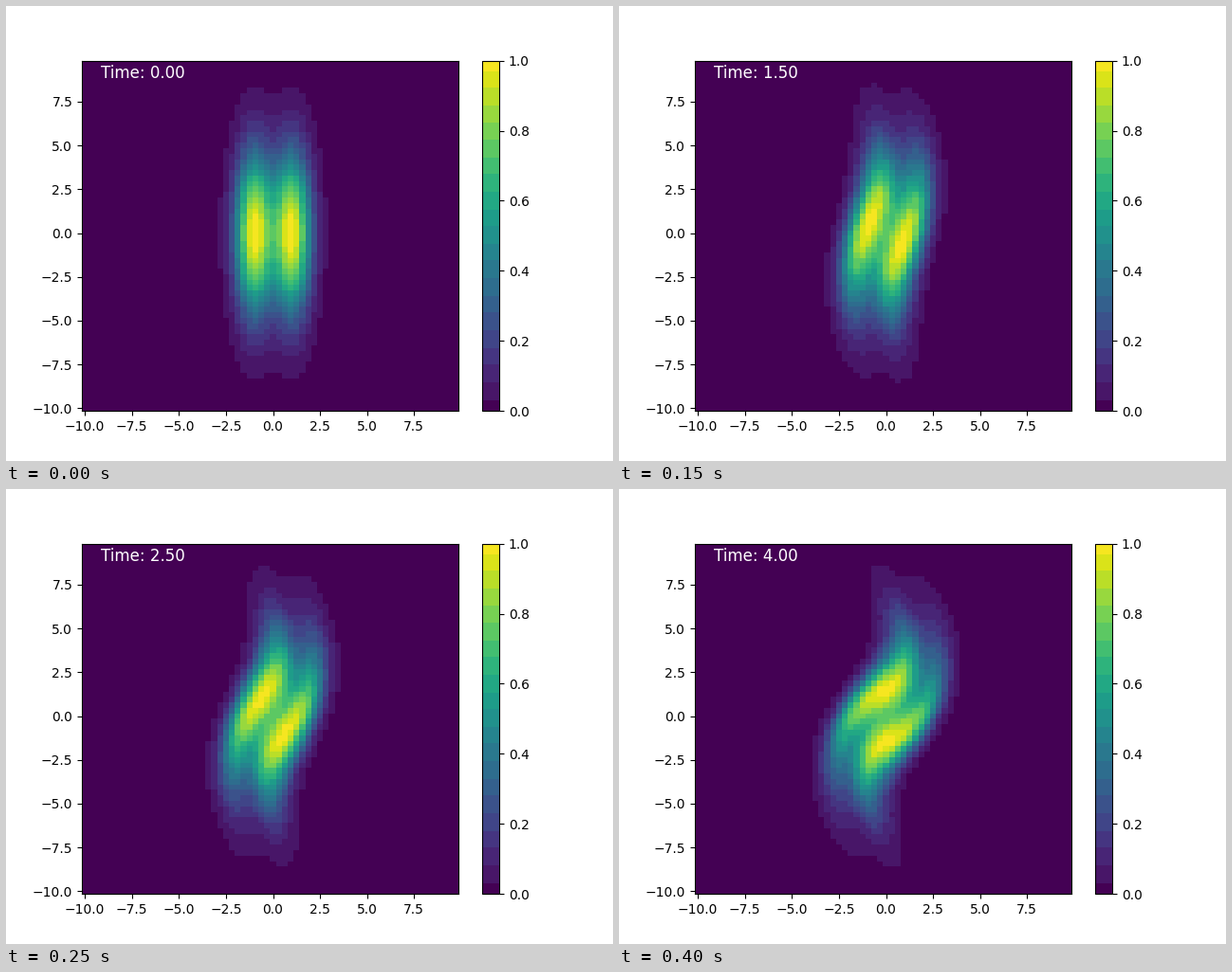
A matplotlib script that plays this animation: 640 px wide and 480 px high, repeating every 450 ms.

```python
import numpy as np
import matplotlib.pyplot as plt
from matplotlib.animation import FuncAnimation
from matplotlib.colors import ListedColormap

N, HALF = 64, 10.0
NU = 0.001
FRAMES, FRAME_DT, SUBSTEPS = 9, 0.5, 20

x = np.linspace(-HALF, HALF, N, endpoint=False)
dx = x[1] - x[0]
X, Y = np.meshgrid(x, x)

k = 2 * np.pi * np.fft.fftfreq(N, d=dx)
KX, KY = np.meshgrid(k, k)
K2 = KX**2 + KY**2
K2[0, 0] = 1.0


def stream(w):
    """Solve the periodic Poisson equation for the stream function."""
    what = np.fft.fft2(w)
    what[0, 0] = 0
    return np.real(np.fft.ifft2(-what / K2))


def diff(f, axis):
    return (np.roll(f, -1, axis) - np.roll(f, 1, axis)) / (2 * dx)


def laplacian(f):
    near = sum(np.roll(f, s, a) for s in (-1, 1) for a in (0, 1))
    return (near - 4 * f) / dx**2


def rhs(w):
    psi = stream(w)
    # Clockwise flow for positive vorticity
    bracket = diff(psi, 1) * diff(w, 0) - diff(psi, 0) * diff(w, 1)
    return NU * laplacian(w) + bracket


def rk4(w, h):
    a = rhs(w)
    b = rhs(w + h / 2 * a)
    c = rhs(w + h / 2 * b)
    d = rhs(w + h * c)
    return w + h / 6 * (a + 2 * b + 2 * c + d)


def simulate():
    w = sum(np.exp(-(X - c)**2 - Y**2 / 20) for c in (-1, 1))
    states = [w]
    for _ in range(FRAMES - 1):
        for _ in range(SUBSTEPS):
            w = rk4(w, FRAME_DT / SUBSTEPS)
        states.append(w)
    return states


def banded_viridis():
    """Viridis in flat bands, with narrower ones at both ends."""
    edges = np.linspace(8, 248, 20)
    centres = np.concatenate([[0], (edges[:-1] + edges[1:]) / 2, [252]])
    band = np.digitize(np.arange(256), edges)
    return ListedColormap(plt.get_cmap("viridis")(centres.astype(int))[band])


states = simulate()

fig, ax = plt.subplots(figsize=(6.4, 4.8), dpi=100)
mesh = ax.pcolormesh(x, x, states[0], cmap=banded_viridis(),
                     vmin=0, vmax=1, shading="nearest")
fig.colorbar(mesh, ax=ax)
label = ax.text(0.05, 0.95, "", transform=ax.transAxes,
                color="white", fontsize=12)


def draw(i):
    mesh.set_array(states[i])
    label.set_text(f"Time: {i * FRAME_DT:.2f}")
    return mesh, label


anim = FuncAnimation(fig, draw, frames=FRAMES, interval=50,
                     repeat=True, repeat_delay=0)
plt.show()
```
